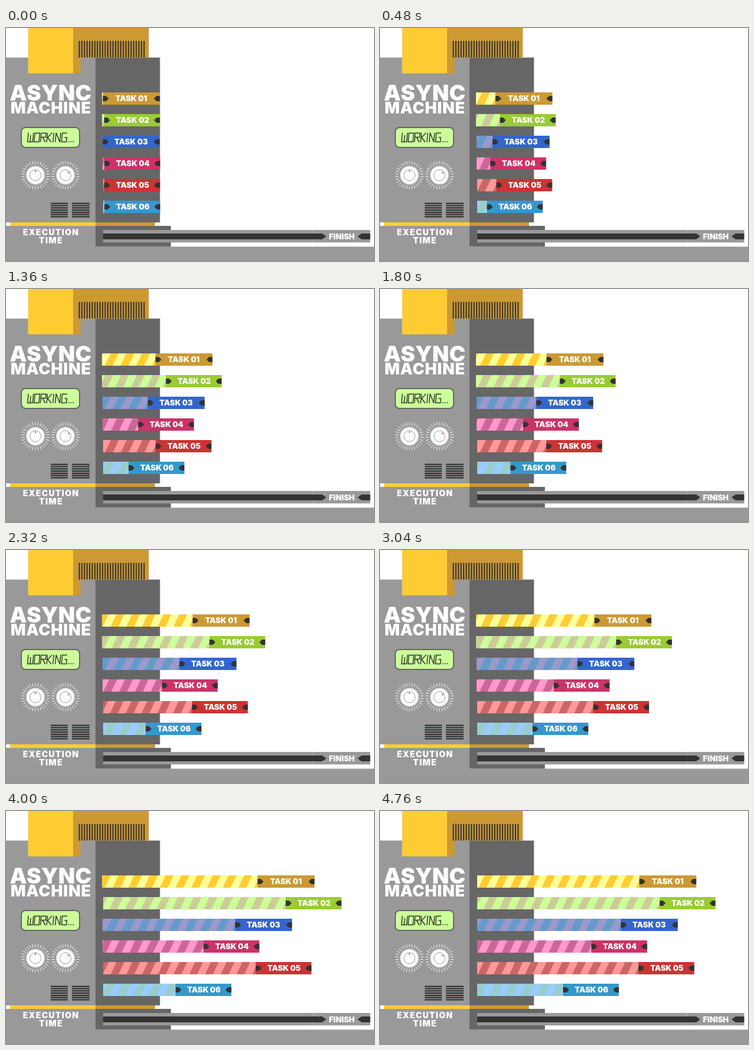
These frames come from a looping animation (625x398 px, 5000 ms). An HTML page:

```html
<!DOCTYPE html>
<html lang="en">
<head>
<meta charset="utf-8">
<title>Async machine</title>
<style>
  html, body { margin: 0; width: 100%; height: 100%; overflow: hidden; background: #fff; }
  svg { display: block; width: 100vw; height: 100vh; }
  text { font-family: Inter, "Open Sans", sans-serif; font-weight: 900; fill: #fff; text-anchor: middle; }
</style>
</head>
<body>
<svg id="stage" viewBox="0 0 625 398" xmlns="http://www.w3.org/2000/svg">
  <defs id="defs"><clipPath id="slots"></clipPath></defs>

  <!-- machine body -->
  <path fill="#999" d="M0 50.6H152V332H0zM0 338H152V373.4H625V398H0z"/>
  <path fill="#666" d="M152 50.6H261.5V332H152zM152 338H280V373.4H152z"/>
  <path fill="#c93" d="M114 0H242.5V50.6H127V77.4H114zM152 332H253V338H152z"/>
  <path fill="#fc3" d="M37.5 0H114V77.4H37.5zM7 332H152V338H7z"/>
  <g id="grille"></g>

  <text x="75.9" y="123.8" font-size="37" letter-spacing=".3">ASYNC</text>
  <text x="76.3" y="145.7" font-size="27" letter-spacing=".8">MACHINE</text>
  <text x="76.5" y="354" font-size="14" letter-spacing="1.3">EXECUTION</text>
  <text x="76.5" y="368" font-size="14" letter-spacing="1.3">TIME</text>

  <!-- display -->
  <rect x="26" y="170" width="99" height="34" rx="7" fill="#cf9" stroke="#666" stroke-width="2"/>
  <g id="lcd" role="img" aria-label="WORKING..." fill="none" stroke="#333" stroke-width="1.5"
     transform="translate(38 179) skewX(-5) scale(.97 1)"></g>

  <g id="dials"></g>
  <g id="vents"></g>

  <!-- finish track -->
  <path fill="#999" d="M165 345H618.5V366.3H165z"/>
  <path fill="#333" d="M165 351H537L544 356L537 361H165zM618.5 351H604L597 356L604 361H618.5z"/>
  <path stroke="#bbb" stroke-width=".7" d="M521.5 345V351M521.5 361V366"/>
  <text x="570.3" y="360.5" font-size="13">FINISH</text>

  <g id="tasks" clip-path="url(#slots)"></g>
</svg>
<script>
const NS = 'http://www.w3.org/2000/svg';
const LOOP = 5000, STEP = 40, HOME = 165;
const PITCH = 26.7, SHIFT = 4;
const $ = id => document.getElementById(id);

function add(parent, tag, attrs, text) {
  const el = document.createElementNS(NS, tag);
  for (const key in attrs) el.setAttribute(key, attrs[key]);
  if (text) el.textContent = text;
  parent.appendChild(el);
  return el;
}

const rect = (parent, x, y, width, height, fill) =>
  add(parent, 'rect', { x, y, width, height, fill });

function drawGrille() {
  for (let i = 0; i < 26; i++) {
    const x = 123.5 + i * 4.4;
    rect($('grille'), x, 22, 2, 28.6, '#333');
    if (i % 4 === 2) rect($('grille'), x + 2, 22, 0.7, 28.6, i % 8 === 2 ? '#c63' : '#993');
  }
}

function drawDisplay() {
  const glyphs = [
    [0, 'M0 0V15.5H9V0M4.5 4V15.5'],
    [11.5, 'M0 .5H8.5V15.5H0z'],
    [22.5, 'M0 16V.5H8.5V7.5H0M3 7.5L8.5 16'],
    [33.5, 'M0 0V16M8 0L1 8L8 16'],
    [44.5, 'M0 0V16'],
    [48.5, 'M0 16V0L8 16V0'],
    [59.5, 'M8.5 .5H0V15.5H8.5V8H4.5']
  ];
  for (const [x, d] of glyphs) add($('lcd'), 'path', { d, transform: `translate(${x})` });
  add($('lcd'), 'path', { d: 'M71 15.2h2M75 15.2h2M79 15.2h2' });
}

function drawDial(cx, cy, angle) {
  const g = add($('dials'), 'g', { transform: `translate(${cx} ${cy})`, fill: 'none' });
  for (let a = 0; a < 360; a += 12)
    add(g, 'path', { d: 'M0 -18.5V-24.3', stroke: '#fff', 'stroke-width': 0.9, transform: `rotate(${a})` });
  add(g, 'circle', { r: 16, fill: '#fff' });
  add(g, 'circle', { r: 15.2, stroke: '#999', 'stroke-width': 1.4, 'stroke-dasharray': '.8 1.6' });
  add(g, 'circle', { r: 9.5, stroke: '#999', 'stroke-width': 1 });
  add(g, 'path', { d: 'M0 -8.5V-5.5', stroke: '#c33', 'stroke-width': 1.5, transform: `rotate(${angle})` });
}

function drawVent(x, width) {
  for (let i = 0; i < 7; i++) {
    const y = 298.5 + i * 3.8;
    rect($('vents'), x, y, width, 2.3, '#333');
    if (i % 3 === 1) rect($('vents'), x, y + 2.3, width, 0.6, i === 1 ? '#696' : '#a55');
  }
}

// mask: left edge of the slot; from/to: label position; speed in px per ms
const tasks = [
  { mask: 163, from: 164.5, to: 440.5, speed: 0.0657, w: 96.7, label: '#c93', a: '#fc3', b: '#ff9' },
  { mask: 163, from: 166.7, to: 475, speed: 0.0771, w: 94.7, label: '#9c3', a: '#cc9', b: '#cf9' },
  { mask: 164, from: 164.3, to: 409, speed: 0.0562, w: 96.7, label: '#36c', a: '#69c', b: '#99c' },
  { mask: 164, from: 167.2, to: 359, speed: 0.0421, w: 94.7, label: '#c36', a: '#f9c', b: '#c69' },
  { mask: 165, from: 166.8, to: 439, speed: 0.0643, w: 94.7, label: '#c33', a: '#c66', b: '#f99' },
  { mask: 165, from: 167.2, to: 311, speed: 0.0302, w: 94.7, label: '#39c', a: '#9cf', b: '#9cc' }
];

function drawTask(task, i) {
  const { mask, to, w, label, a, b } = task;
  const y = 110 + i * 37, len = to - HOME, id = 'stripes' + i;
  add($('slots'), 'rect', { x: mask, y, width: 625 - mask, height: 21 });

  const pattern = add($('defs'), 'pattern', {
    id, width: PITCH, height: 21, patternUnits: 'userSpaceOnUse',
    patternTransform: `translate(${SHIFT}) skewX(-25)`
  });
  rect(pattern, 0, 0, PITCH, 21, a);
  rect(pattern, PITCH / 2, 0, PITCH / 2, 21, b);

  task.y = y;
  task.el = add($('tasks'), 'g', {});
  rect(task.el, -len, 0, len + 0.5, 21, `url(#${id})`);
  rect(task.el, 0, 0, w, 21, label);
  add(task.el, 'path', {
    fill: '#333',
    d: `M0 6H5.5L10 10.5L5.5 15H0zM${w} 6h-5.5l-4.5 4.5l4.5 4.5h5.5z`
  });
  add(task.el, 'text', { x: 48.2, y: 15.2, 'font-size': 13 }, 'TASK 0' + (i + 1));
}

function render(now) {
  const t = Math.floor((now % LOOP) / STEP) * STEP;
  for (const { el, y, from, to, speed } of tasks) {
    const x = Math.min(to, from + speed * t);
    el.setAttribute('transform', `translate(${x.toFixed(2)} ${y})`);
  }
}

function tick() {
  render(performance.now());
  requestAnimationFrame(tick);
}

drawGrille();
drawDisplay();
drawDial(50, 251.4, 0);
drawDial(101, 251.4, 50);
drawVent(76, 29);
drawVent(112, 30);
tasks.forEach(drawTask);
tick();
</script>
</body>
</html>
```
